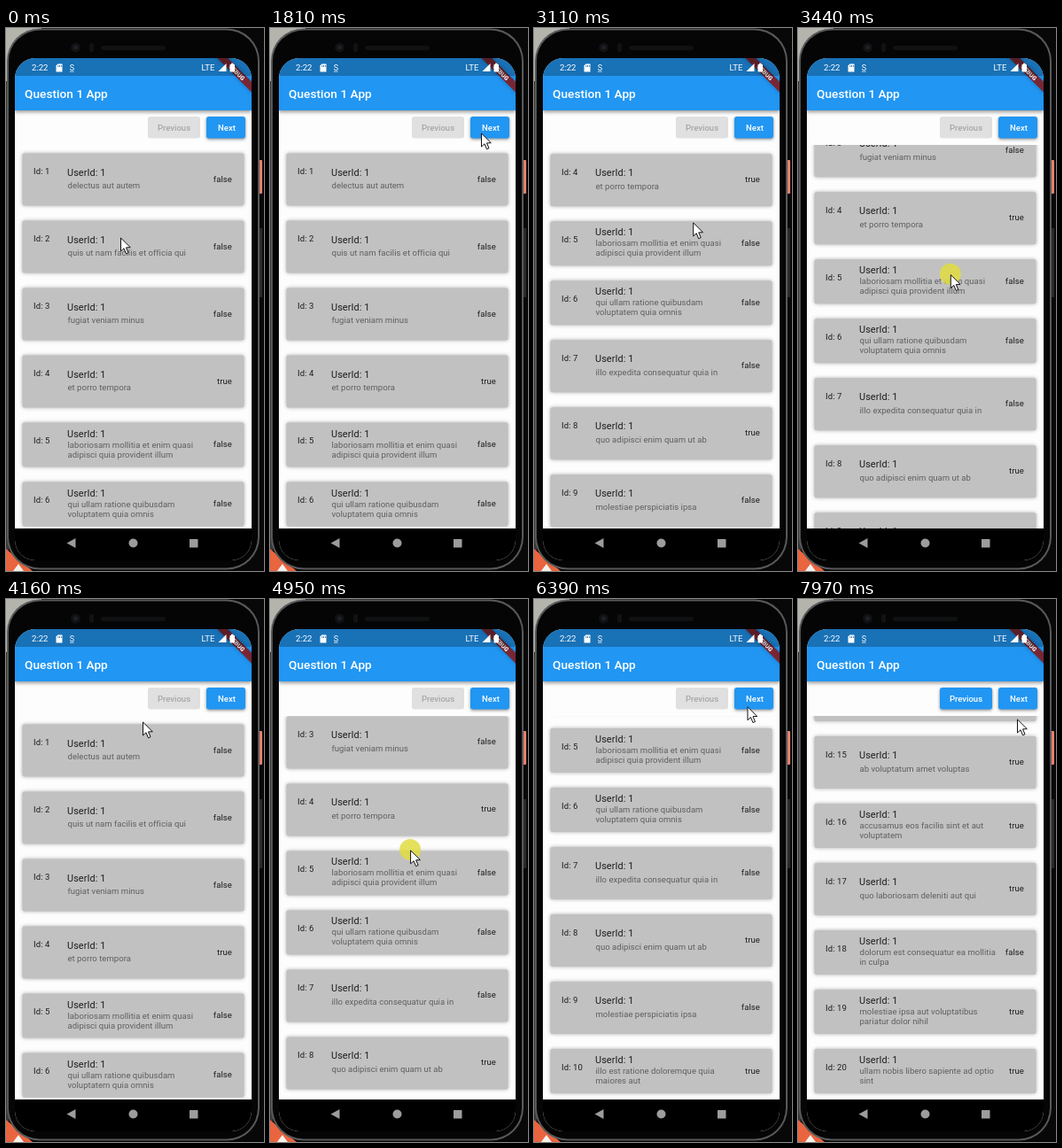
These frames come from a looping animation (291 by 613 pixels, 8 s). An HTML page with a canvas:

```html
<!DOCTYPE html>
<html lang="en">
<head>
<meta charset="utf-8">
<title>Question 1 App</title>
<style>
  html, body { margin: 0; width: 100%; height: 100%; overflow: hidden; background: #0b0b0b; }
  canvas { display: block; width: 291px; height: 613px; }
</style>
</head>
<body>
<canvas id="stage" width="291" height="613"></canvas>
<script>
const ctx = document.getElementById('stage').getContext('2d');
const LOOP = 8000, CLICK = 6480, PAGE_SWITCH = 7150;
const LEFT = 10, RIGHT = 277, WIDTH = RIGHT - LEFT;
const SCREEN_TOP = 34, LIST_TOP = 132, LIST_BOTTOM = 565;
const FIRST_CARD = 141, TALL_ROW = 76, SHORT_ROW = 67, VIEW_HEIGHT = 433.5;

// Each item: subtitle lines separated by "|", then completed flag.
const pages = [
  [['delectus aut autem', false],
   ['quis ut nam facilis et officia qui', false],
   ['fugiat veniam minus', false],
   ['et porro tempora', true],
   ['laboriosam mollitia et enim quasi|adipisci quia provident illum', false],
   ['qui ullam ratione quibusdam|voluptatem quia omnis', false],
   ['illo expedita consequatur quia in', false],
   ['quo adipisci enim quam ut ab', true],
   ['molestiae perspiciatis ipsa', false],
   ['illo est ratione doloremque quia|maiores aut', true]],
  [['vero rerum temporibus dolor', true],
   ['ipsa repellendus fugit nisi', true],
   ['et doloremque nulla', false],
   ['repellendus sunt dolores|architecto voluptatum', true],
   ['ab voluptatum amet voluptas', true],
   ['accusamus eos facilis sint et aut|voluptatem', true],
   ['quo laboriosam deleniti aut qui', true],
   ['dolorum est consequatur ea mollitia|in culpa', false],
   ['molestiae ipsa aut voluptatibus|pariatur dolor nihil', true],
   ['ullam nobis libero sapiente ad optio|sint', true]]
];

// Pointer gestures; a drag also scrolls the list and may end in a fling.
const move = (from, to, x, y) => ({ from, to, x, y });
const drag = (from, to, x, y, fling = 0) => ({ from, to, x, y, fling, drag: true });
const gestures = [
  move(30, 150, 147, 179),
  move(810, 1590, 231, 128),
  move(1620, 1810, 238, 118),
  move(1980, 2130, 243, 113),
  move(2300, 2640, 186, 317),
  drag(2640, 2930, 182, 225, 158),
  move(2930, 3310, 176, 212),
  drag(3310, 3700, 160, 462),
  move(3980, 4160, 154, 138),
  drag(4200, 4640, 165, 444),
  drag(4790, 5130, 150, 94),
  move(5130, 5520, 171, 195),
  move(5810, 6480, 244, 117),
  move(7965, 7970, 247, 135)
];

const clamp = (v, low = 0, high = 1) => Math.min(high, Math.max(low, v));
const progress = (t, from, to) => clamp((t - from) / (to - from));
const ease = p => p * p * (3 - 2 * p);
const easeOut = p => 1 - (1 - p) ** 3;
const rowHeight = ([text]) => text.includes('|') ? SHORT_ROW : TALL_ROW;

function stateAt(t) {
  const page = t < PAGE_SWITCH ? 0 : 1;
  const maxScroll = pages[page].reduce((sum, item) => sum + rowHeight(item), -VIEW_HEIGHT);
  const state = { page, x: 129, y: 236, scroll: 0, glow: 0, pressed: t >= CLICK && t < CLICK + 200 };
  for (const g of gestures) {
    if (t < g.from) break;
    const p = ease(progress(t, g.from, g.to)), dy = (g.y - state.y) * p;
    state.x += (g.x - state.x) * p;
    state.y += dy;
    if (!g.drag) continue;
    const wanted = state.scroll - dy + g.fling * easeOut(progress(t, g.to, g.to + 380));
    state.scroll = clamp(wanted, 0, maxScroll);
    state.glow = (wanted - state.scroll) / 300 * (1 - progress(t, g.to - 100, g.to + 300));
    state.pressed ||= t < g.to;
  }
  state.scroll = Math.min(state.scroll, maxScroll);
  return state;
}

function box(x, y, w, h, r, fill) {
  ctx.beginPath();
  ctx.roundRect(x, y, w, h, r);
  ctx.fillStyle = fill;
  ctx.fill();
}

function disc(x, y, r, fill) {
  ctx.beginPath();
  ctx.arc(x, y, r, 0, Math.PI * 2);
  ctx.fillStyle = fill;
  ctx.fill();
}

function poly(points, fill) {
  ctx.beginPath();
  points.forEach(([x, y]) => ctx.lineTo(x, y));
  ctx.closePath();
  ctx.fillStyle = fill;
  ctx.fill();
}

function label(str, x, y, size, fill, { weight = 400, align = 'left', spacing = 0 } = {}) {
  ctx.font = `${weight} ${size}px Roboto, sans-serif`;
  ctx.letterSpacing = spacing + 'px';
  ctx.textAlign = align;
  ctx.fillStyle = fill;
  ctx.fillText(str, x, y);
}

function withState(draw) {
  ctx.save();
  draw();
  ctx.restore();
}

function shadow(color, blur, dy = 0) {
  ctx.shadowColor = color;
  ctx.shadowBlur = blur;
  ctx.shadowOffsetY = dy;
}

function drawPhone() {
  box(0, 0, 291, 613, 0, '#080808');
  box(0, 0, 40, 60, 0, '#b4b4ac');
  box(0, 60, 3, 540, 0, '#3a3b39');
  poly([[0, 588], [30, 613], [0, 613]], '#e9653f');
  poly([[8, 613], [14, 605], [20, 613]], '#f4f0ec');
  box(284, 149, 5, 38, 1, '#e58268');
  box(284, 226, 5, 78, 1, '#2b2b2b');
  box(1, 0.5, 285, 611, 37, '#58595b');
  box(3, 2.5, 281, 607, 35, '#050505');
  disc(78.5, 22, 5.5, '#101113');
  disc(78.5, 22, 2.5, '#1d2026');
  box(94, 17, 5, 10, 2, '#101113');
  box(107, 20, 73, 5, 2.5, '#101112');
}

function drawCard(id, item, y) {
  const [text, done] = item, tall = rowHeight(item) === TALL_ROW, height = tall ? 60 : 51;
  withState(() => {
    shadow('#aaa', 4);
    box(18.5, y + 0.5, 250, height - 1, 2, '#c1c1c1');
  });
  const ink = '#1d1d1d', small = 9.52;
  label('Id: ' + id, 31, y + 24, small, ink, { spacing: 0.1 });
  label('UserId: 1', 69, y + (tall ? 25.6 : 16.6), 10.88, ink, { spacing: 0.1 });
  text.split('|').forEach((line, i) =>
    label(line, 69.5, y + (tall ? 40 : 28.5) + i * 11, small, '#5f5f5f', { spacing: 0.03 }));
  label(String(done), 255, y + (tall ? 32.5 : 28), small, ink, { align: 'right', spacing: 0.1 });
}

function drawGlow(glow) {
  const amount = clamp(Math.abs(glow));
  if (amount < 0.01) return;
  ctx.beginPath();
  ctx.ellipse(143.5, glow < 0 ? LIST_TOP : LIST_BOTTOM, 170, 36 * amount, 0, 0, Math.PI * 2);
  ctx.fillStyle = `rgba(33,150,243,${0.25 * amount})`;
  ctx.fill();
}

function drawList({ page, scroll, glow }) {
  let y = FIRST_CARD - scroll;
  withState(() => {
    ctx.beginPath();
    ctx.rect(LEFT, LIST_TOP, WIDTH, LIST_BOTTOM - LIST_TOP);
    ctx.clip();
    pages[page].forEach((item, i) => {
      drawCard(page * 10 + i + 1, item, y);
      y += rowHeight(item);
    });
    drawGlow(glow);
  });
}

function drawButton(text, x, w, fill, ink, lift) {
  withState(() => {
    shadow(`rgba(0,0,0,${0.45 * lift})`, 3.5, 1.3);
    box(x, 100, w, 24.5, 2.7, fill);
  });
  label(text, x + w / 2 + (w < 50 ? 1 : 0), 115.7, 9.52, ink, { weight: 500, align: 'center' });
}

function drawButtons(t) {
  const on = progress(t, PAGE_SWITCH, PAGE_SWITCH + 120);
  const mix = (...pairs) => `rgb(${pairs.map(([a, b]) => a + (b - a) * on)})`;
  drawButton('Previous', 160, 59, mix([224, 33], [224, 150], [224, 243]),
    mix([166, 255], [166, 255], [166, 255]), on);
  drawButton('Next', 226, 44, '#2196f3', '#fff', 1);
  const ripple = progress(t, CLICK, CLICK + 410);
  if (ripple > 0 && ripple < 1) withState(() => {
    ctx.beginPath();
    ctx.roundRect(226, 100, 44, 24.5, 2.7);
    ctx.clip();
    disc(244, 117, 6 + 40 * ripple, `rgba(255,255,255,${0.26 * (1 - ripple)})`);
  });
}

function drawBars() {
  withState(() => {
    shadow('rgba(0,0,0,.4)', 4, 2);
    box(LEFT, SCREEN_TOP, WIDTH, 59, 0, '#2196f3');
  });
  label('Question 1 App', 21, 79, 13.6, '#fff', { weight: 500, spacing: 0.05 });
  withState(() => {
    ctx.translate(RIGHT, SCREEN_TOP);
    ctx.rotate(Math.PI / 4);
    shadow('rgba(0,0,0,.5)', 5);
    box(-30, 19, 60, 8.2, 0, 'rgba(0,0,0,.5)');
    ctx.shadowColor = 'transparent';
    box(-30, 19, 60, 8.2, 0, 'rgba(183,28,28,.63)');
    label('DEBUG', 0, 25.6, 6.7, '#fff', { weight: 900, align: 'center' });
  });
  box(LEFT, SCREEN_TOP, WIDTH, 20, 0, 'rgba(0,0,0,.25)');
}

function drawStatus() {
  label('2:22', 29, 48.3, 9.6, '#fff');
  poly([[58.5, 40.5], [63.5, 40.5], [63.5, 49.5], [56.5, 49.5], [56.5, 42.5]], '#fff');
  for (let x = 58.5; x < 62; x += 1.7) box(x, 42, 0.8, 2, 0, '#1a71b8');
  label('S', 74.3, 47.5, 9, '#fff', { align: 'center' });
  box(72, 48.7, 4.5, 0.8, 0, '#fff');
  label('LTE', 220.5, 48.2, 9.5, '#fff');
  poly([[248.5, 40], [248.5, 49], [239.5, 49]], '#fff');
  box(252.5, 41, 5.5, 8.5, 0.8, '#fff');
  box(254, 39.8, 2.5, 2, 0, '#fff');
}

function drawNavigation() {
  const grey = '#9c9c9c';
  box(LEFT, LIST_BOTTOM, WIDTH, 36, 0, '#000');
  poly([[68.5, 581.5], [78.5, 576], [78.5, 587]], grey);
  disc(143.5, 581.5, 5, grey);
  box(207, 577, 9.5, 9.5, 0.5, grey);
}

function drawPointer({ x, y, pressed }) {
  if (pressed) disc(x, y, 12, 'rgba(225,220,65,.85)');
  withState(() => {
    ctx.translate(x, y + 0.5);
    poly([[0.5, 0.5], [0.5, 15.5], [4, 12.3], [6.5, 18.3], [9, 17.2], [6.5, 11.4], [11.3, 11.2]], '#fff');
    ctx.lineWidth = 1;
    ctx.strokeStyle = '#111';
    ctx.stroke();
  });
}

function render(t) {
  const state = stateAt(t);
  drawPhone();
  withState(() => {
    ctx.beginPath();
    ctx.roundRect(LEFT, SCREEN_TOP, WIDTH, 567, 23);
    ctx.clip();
    box(LEFT, SCREEN_TOP, WIDTH, 567, 0, '#fdfdfd');
    drawList(state);
    drawButtons(t);
    drawBars();
    drawStatus();
    drawNavigation();
  });
  drawPointer(state);
}

const start = performance.now();
function tick() {
  render((performance.now() - start) % LOOP);
  requestAnimationFrame(tick);
}
tick();
</script>
</body>
</html>
```
